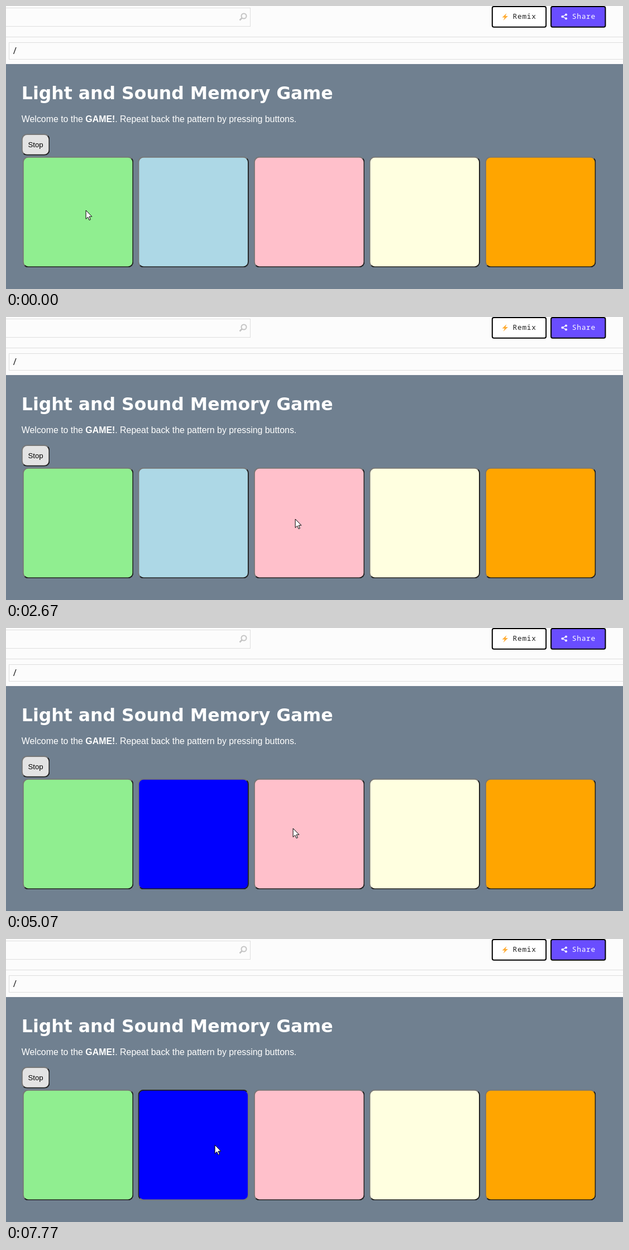
An HTML page for the animation above (8000 ms loop, 1105 by 507 pixels).

```html
<!DOCTYPE html>
<html lang="en">
<head>
<meta charset="utf-8">
<style>
html, body { margin: 0; width: 100%; height: 100%; overflow: hidden; background: #fcfcfc; }
body { position: relative; font: 16px/18px "Liberation Sans", Arial, sans-serif; }
body *:not(b, svg *) { position: absolute; box-sizing: border-box; margin: 0; white-space: nowrap; }
.field { border: 1px solid #dedede; }
/* the whole screen is shown slightly reduced */
.bar, .page { left: .2px; transform: scale(.993); transform-origin: 0 0; }
.bar { top: 0; }
.page { top: 103.8px; width: 1120px; height: 420px; background: #708090; }
.tool { top: 0; height: 39px; border: 2px solid #000; border-radius: 4px; background: #fff; color: #222;
  font: 500 13px/33px "Noto Sans Mono", monospace; letter-spacing: .65px; }
h1, p { left: 28px; color: #fff; }
h1 { top: 33px; font: bold 31.75px/39px "DejaVu Sans", Verdana, sans-serif; }
p { top: 91px; }
.button { border: 2px outset #767676; border-radius: 10px; }
.stop { left: 28px; top: 126px; width: 51px; height: 39px; background: #e3e3e3; color: #000;
  font-size: 13.333px; line-height: 35px; text-align: center; }
.tile { top: 167px; width: 200px; height: 200px; }
svg { left: 0; top: 0; }
</style>
</head>
<body>
<div class="field" style="left:-5px;top:3px;width:443px;height:34px"></div>
<div style="left:0;top:55px;width:1105px;height:1px;background:#dedede"></div>
<div class="field" style="left:5px;top:65px;width:1110px;height:31px"></div>
<div style="left:11px;top:71px;color:#222;font:16px/18px 'Noto Sans Mono',monospace">/</div>
<div class="bar">
  <div class="tool" style="left:876px;width:99px;padding-left:36px">Remix</div>
  <div class="tool" style="left:982px;width:100px;padding-left:37px;background:#694dff;color:#fff">Share</div>
</div>
<div class="page" id="page">
  <h1>Light and Sound Memory Game</h1>
  <p>Welcome to the <b>GAME!</b>. Repeat back the pattern by pressing buttons.</p>
  <div class="button stop">Stop</div>
</div>
<svg width="1105" height="507">
  <g fill="none" stroke="#c4c4c4" stroke-width="2">
    <circle cx="426" cy="18" r="4.5"/>
    <path d="M422.5 21.5L418.5 25.5" stroke-width="2.5"/>
  </g>
  <path d="M896.5 13L888.5 20.5H893L890.5 26L899 18H894.5Z" fill="#ffac33"/>
  <path d="M1003 15.5L996.5 19L1003 22.5" fill="none" stroke="#fff" stroke-width="1.3"/>
  <g fill="#fff"><circle cx="996.5" cy="19" r="2.1"/><circle cx="1003" cy="15.5" r="2.1"/><circle cx="1003" cy="22.5" r="2.1"/></g>
  <path id="cursor" d="M.5 .8V16.3L4.1 12.9L6.5 18.4L8.8 17.4L6.5 12H11.3Z" fill="#fff" stroke="#000"/>
</svg>
<script>
const LOOP = 8000;
const page = document.getElementById('page');
const cursor = document.getElementById('cursor');

const tiles = ['#90ee90', '#add8e6', '#ffc0cb', '#ffffe0', '#ffa500'].map((color, i) => {
  const el = document.createElement('div');
  el.className = 'button tile';
  el.style.left = Math.round(30 + 208.45 * i) + 'px';
  page.append(el);
  return { el, color };
});

// start, end, tile, lit colour, pressed by the pointer
const lights = [
  [260, 1250, 2, '#f00', false],
  [2250, 2670, 2, '#f00', true],
  [3690, 4790, 2, '#f00', false],
  [5070, 6100, 1, '#00f', false],
  [6490, 7220, 2, '#f00', true],
  [7770, LOOP, 1, '#00f', true]
];

// time, x, y of the pointer tip
const moves = [
  [0, 142, 365], [400, 142, 364], [540, 142, 363], [690, 146, 362],
  [830, 458, 371], [980, 506, 370], [1120, 517, 363], [1700, 518, 363],
  [1840, 518, 362], [1980, 517, 361], [3530, 516, 360], [4920, 515, 359],
  [5070, 513, 358], [7350, 480, 359], [7490, 400, 366], [7620, 373, 368]
];

function draw() {
  const t = performance.now() % LOOP;
  tiles.forEach(({ el, color }, i) => {
    const light = lights.find(([from, to, tile]) => tile === i && t >= from && t < to);
    el.style.background = light ? light[3] : color;
    el.style.borderStyle = light && light[4] ? 'inset' : 'outset';
  });
  const [, x, y] = moves.findLast(([time]) => time <= t);
  cursor.setAttribute('transform', `translate(${x + .6} ${y + .2})`);
  requestAnimationFrame(draw);
}
draw();
</script>
</body>
</html>
```
